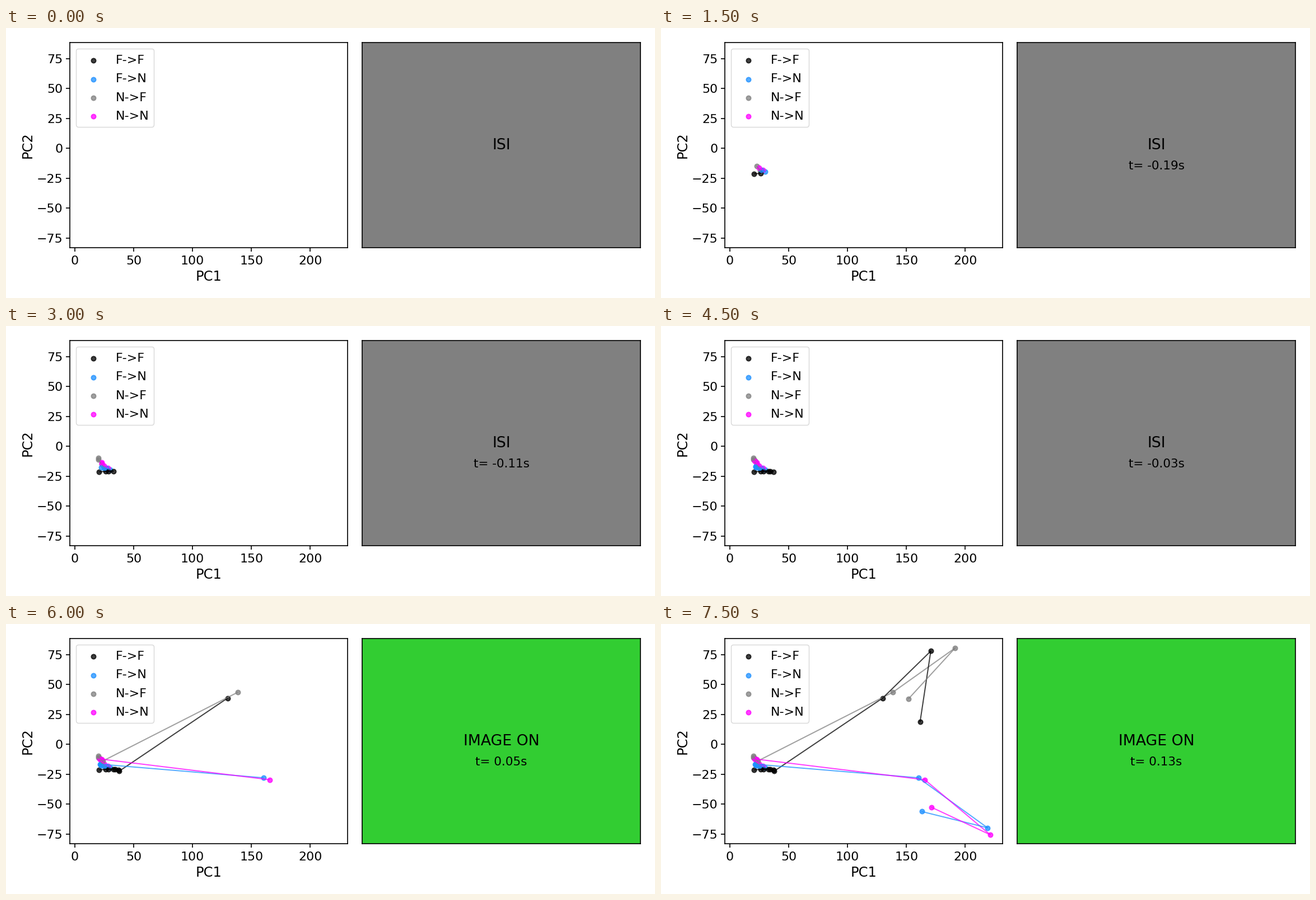
A matplotlib script for the animation above (8 s loop, 1159 px wide and 483 px high).

```python
import matplotlib.pyplot as plt
import numpy as np
from matplotlib.animation import FuncAnimation

W, H = 1159, 483
DPI = W / 12
plt.rcParams.update({
    "font.family": "DejaVu Sans", "font.size": 18,
    "axes.labelsize": 18, "axes.linewidth": 1.25,
    "xtick.labelsize": 16.5, "ytick.labelsize": 16.5, "legend.fontsize": 16.5,
    "xtick.major.size": 5.2, "ytick.major.size": 5.2,
    "xtick.major.width": 1.25, "ytick.major.width": 1.25,
    "xtick.major.pad": 5.5, "ytick.major.pad": 4.1,
})

QUIET_STEPS = 7
FRAMES_PER_STEP = 3
T_START, T_STEP = -0.23, 0.04
JITTER = 0.7

# Before the image: start, end and bend of the drift; after it: the response
CONDITIONS = {
    "F->F": dict(color="black", start=(20.5, -21.4), end=(37.7, -22.4), bend=(4, 1),
                 response=[(129.8, 38.7), (170.7, 78.0), (161.6, 18.8)]),
    "F->N": dict(color="dodgerblue", start=(30.2, -19.6), end=(21.5, -16.6), bend=(-3, 1),
                 response=[(160.2, -28.0), (218.9, -69.8), (163.0, -56.2)]),
    "N->F": dict(color="gray", start=(25.7, -18.6), end=(23.6, -14.0), bend=(-5, 6),
                 response=[(138.5, 43.6), (191.4, 80.6), (151.9, 38.2)]),
    "N->N": dict(color="magenta", start=(28.0, -18.0), end=(22.7, -12.4), bend=(-4, 2),
                 response=[(165.6, -29.6), (221.2, -75.6), (171.2, -52.6)]),
}
rng = np.random.default_rng(4)


def trajectory(start, end, bend, response):
    """Jittered arc from start to end, followed by the response points."""
    u = np.linspace(0, 1, QUIET_STEPS)[:, None]
    line = np.array(start) * (1 - u) + np.array(end) * u
    wander = np.array(bend) + rng.normal(0, JITTER, line.shape)
    return np.vstack([line + wander * np.sin(np.pi * u), response])


fig = plt.figure(figsize=((W + 0.001) / DPI, (H + 0.001) / DPI), dpi=DPI,
                 facecolor="white")


def pixel_axes(left, right, top=26, bottom=393):
    return fig.add_axes([left / W, 1 - bottom / H, (right - left) / W, (bottom - top) / H])


ax = pixel_axes(113.8, 610.2)
ax.set(xticks=range(0, 201, 50), yticks=range(-75, 76, 25))
ax.set_xlabel("PC1")
ax.set_ylabel("PC2", labelpad=3.4)

screen = pixel_axes(636.3, 1133)
screen.set(xticks=[], yticks=[])
center = dict(transform=screen.transAxes, ha="center", va="center")
state_text = screen.text(0.5, 0.5, "", size=20, **center)
time_text = screen.text(0.5, 0.398, "", size=16, **center)


def dots(x, y, color, **kwargs):
    return ax.scatter(x, y, s=36, linewidths=1.5, color=color, alpha=0.75, **kwargs)


# Artists grouped by the step at which they appear
paths = []
for label, spec in CONDITIONS.items():
    color = spec.pop("color")
    dots([], [], color, label=label)
    paths.append((color, trajectory(**spec)))

steps = []
for k in range(len(paths[0][1])):
    group = []
    for color, points in paths:
        group.append(dots(*points[k], color))
        if k:
            group += ax.plot(*points[k - 1:k + 1].T, color=color, lw=1.5, alpha=0.75)
    steps.append(group)

ax.set(xlim=(-4.38, 231.8), ylim=(-83.1, 88.5))
ax.legend(loc="upper left", handleheight=1.1, scatteryoffsets=[0.27])


def update(frame):
    shown = frame // FRAMES_PER_STEP
    for k, group in enumerate(steps):
        for artist in group:
            artist.set_visible(k < shown)
    t = T_START + T_STEP * (shown - 1)
    image_on = t > 0
    screen.set_facecolor("limegreen" if image_on else "gray")
    state_text.set_text("IMAGE ON" if image_on else "ISI")
    time_text.set_text(f"t= {t:.2f}s" if shown else "")
    return []


anim = FuncAnimation(fig, update, frames=32, interval=250, repeat=True,
                     repeat_delay=0, blit=False)
plt.show()
```
